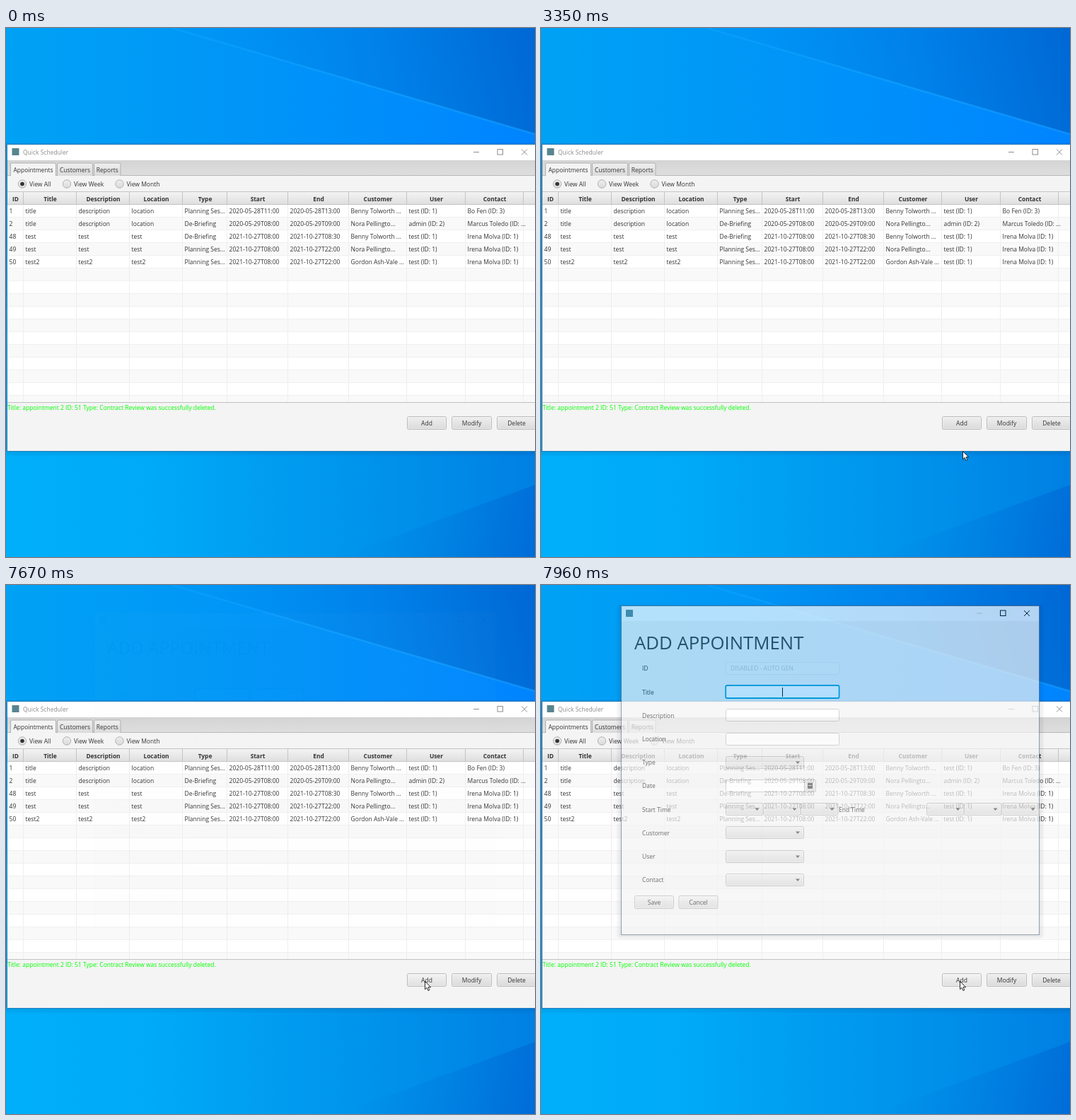
Recreate the animation shown at these times as an HTML page. Size 748 by 748 pixels, loop 8 s.

```html
<!DOCTYPE html>
<html lang="en">
<head>
<meta charset="utf-8">
<title>Scheduler</title>
<style>
html, body { margin: 0; width: 100%; height: 100%; overflow: hidden; background: #009cf0; }
svg { display: block; width: 100vw; height: 100vh; }
text { font: 8.5px "Open Sans", "Noto Sans", sans-serif; fill: #333; white-space: pre; }
.head { font-weight: 700; font-size: 8.4px; }
.big { font-size: 25.7px; }
.mid { text-anchor: middle; }
</style>
</head>
<body>
<svg id="stage" viewBox="0 0 748 748" xmlns="http://www.w3.org/2000/svg"></svg>
<script>
const LOOP = 8000;
const stage = document.getElementById("stage");

// Markup helpers
const rect = (x, y, w, h, fill, more = "") =>
  `<rect x="${x}" y="${y}" width="${w}" height="${h}" fill="${fill}" ${more}/>`;
const line = (x1, y1, x2, y2, color, more = "") =>
  `<path d="M${x1} ${y1}L${x2} ${y2}" stroke="${color}" fill="none" ${more}/>`;
const text = (x, y, s, cls = "", more = "") => `<text x="${x}" y="${y}" class="${cls}" ${more}>${s}</text>`;
const gradient = (id, dir, ...stops) =>
  `<linearGradient id="${id}" ${dir}>` + stops.map(([at, c, o = 1]) =>
    `<stop offset="${at}" stop-color="${c}" stop-opacity="${o}"/>`).join("") + `</linearGradient>`;
const DOWN = 'x1="0" y1="0" x2="0" y2="1"';
const ACROSS = 'x1="0" y1="0" x2="1" y2="0"';

const box = (x, y, w, h, fill, edge, more = "") =>
  rect(x + .5, y + .5, w - 1, h - 1, fill, `stroke="${edge}" rx="2" ${more}`);
const raised = (x, y, w, h, more = "") => box(x, y, w, h, "url(#btn)", "#b9b9b9", more) +
  rect(x + 1.4, y + 1.4, w - 2.8, h - 2.8, "none", 'stroke="#fff" stroke-opacity=".45" stroke-width=".8" rx="1.5"');
const button = (x, y, w, h, label, id = "") =>
  raised(x, y, w, h, id && `id="${id}"`) + text(x + w / 2, y + 12.8, label, "mid");
const combo = (x, y, w) => raised(x, y, w, 18) +
  `<path d="M${x + w - 12} ${y + 7.6}h6l-3 3.4z" fill="#555"/>`;

function controls(minX, maxX, closeX, y, minColor) {
  return line(minX, y, minX + 8, y, minColor) +
    `<rect x="${maxX}" y="${y - 4}" width="7.5" height="7.5" fill="none"/>` +
    `<path d="M${closeX} ${y - 4}l8 8m0-8l-8 8" fill="none"/>`;
}

function shadow(x, y, w, h) {
  let out = "";
  for (let i = 1; i < 8; i++) {
    out += rect(x - i, y - i / 3, w + 2 * i, h + i * 1.33, "#001830", `rx="${i}" opacity=".03"`);
  }
  return out;
}

function wallpaper() {
  return rect(0, 0, 748, 380, "url(#skyTop)") +
    `<path d="M235 0L748 150V0Z" fill="url(#ray)"/>` +
    line(235, 0, 748, 150, "url(#beam)", 'stroke-width="2.6"') +
    rect(0, 380, 748, 368, "url(#skyLow)") +
    `<path d="M470 748L748 646V748Z" fill="url(#rayLow)"/>`;
}

// Main window
const edges = [2, 25, 100, 175, 250, 313, 399, 485, 567, 650, 732];
const heads = ["ID", "Title", "Description", "Location", "Type", "Start", "End", "Customer", "User", "Contact"];
const plan = "Planning Ses...", brief = "De-Briefing";
const ben = "Benny Tolworth ...", nora = "Nora Pellingto...", irena = "Irena Molva (ID: 1)";
const user = "test (ID: 1)", day = "2021-10-27T";
const rows = [
  ["1", "title", "description", "location", plan, "2020-05-28T11:00", "2020-05-28T13:00", ben, user, "Bo Fen (ID: 3)"],
  ["2", "title", "description", "location", brief, "2020-05-29T08:00", "2020-05-29T09:00", nora, "admin (ID: 2)", "Marcus Toledo (ID: ..."],
  ["48", "test", "test", "test", brief, day + "08:00", day + "08:30", ben, user, irena],
  ["49", "test", "test", "test", plan, day + "08:00", day + "22:00", nora, user, irena],
  ["50", "test2", "test2", "test2", plan, day + "08:00", day + "22:00", "Gordon Ash-Vale ...", user, irena]
];

function table() {
  let out = rect(2, 232, 746, 298, "#fff");
  for (let i = 0; i < 16; i++) {
    const y = 250 + 18 * i;
    if (i % 2) out += rect(2, y, 746, Math.min(18, 530 - y), "#f9f9f9");
    if (i) out += line(2, y - .5, 748, y - .5, "#f0f0f0");
  }
  out += rect(2, 232, 746, 18, "url(#head)") +
    line(2, 231.5, 748, 231.5, "#c4c4c4") + line(2, 249.5, 748, 249.5, "#c4c4c4");
  edges.slice(1).forEach(x => {
    out += line(x - .5, 232, x - .5, 250, "#c4c4c4") + line(x - .5, 250, x - .5, 530, "#eee");
  });
  heads.forEach((s, i) => out += text((edges[i] + edges[i + 1]) / 2, 244.5, s, "head mid"));
  rows.forEach((row, r) => row.forEach((s, c) =>
    out += text(edges[c] + 2.6, 262 + 18 * r, s)));
  return out + line(2, 529.5, 748, 529.5, "#c0c0c0");
}

function tab(x, w, label, on) {
  return `<path d="M${x + .5} 209V193q0-2 2-2H${x + w - 2.5}q2 0 2 2V209" stroke="#b0b0b0"
    fill="${on ? "#f4f4f4" : "url(#btn)"}"/>` + text(x + w / 2, 203.5, label, "mid");
}

function radio(x, label, on) {
  return `<circle cx="${x}" cy="220.5" r="5.7" fill="url(#btn)" stroke="#b0b0b0"/>` +
    (on ? `<circle cx="${x}" cy="220.5" r="2.8" fill="#333"/>` : "") + text(x + 10, 224, label);
}

function mainWindow() {
  return `<g id="mainShadow">${shadow(2, 164, 780, 435)}</g>` +
    rect(1.5, 164.5, 780, 434, "#f4f4f4", 'stroke="#2a7fb8"') +
    rect(2, 165, 746, 22, "#fff") + rect(8.5, 170, 10, 10, "#57858f") +
    text(24, 178.8, "Quick Scheduler", "", 'id="caption"') +
    `<g id="mainCtl">${controls(661, 695, 729, 175.5, "inherit")}</g>` +
    rect(2, 187, 746, 22, "url(#strip)") + line(2, 208.5, 748, 208.5, "#b8b8b8") +
    tab(72, 51, "Customers") + tab(124, 38.5, "Reports") + tab(6, 65, "Appointments", true) +
    radio(23, "View All", true) + radio(86, "View Week") + radio(160.5, "View Month") +
    table() +
    text(2, 540, "Title: appointment 2 ID: 51 Type: Contract Review was successfully deleted.", "", 'style="fill:#0f0"') +
    button(567, 549, 56, 19, "Add", "add") + button(630, 549, 57, 19, "Modify") +
    button(694, 549, 56, 19, "Delete");
}

// Dialog
function dialog() {
  const labels = ["ID", "Title", "Description", "Location", "Type", "Date", "Start Time", "Customer", "User", "Contact"];
  const top = i => Math.round(109 + 33.2 * i);
  const field = (i, w = 161) => box(261, top(i), w, 18, "#fff", "#c4c4c4");
  return `<g opacity=".6">${shadow(113, 29, 592, 465)}</g>` +
    rect(113.5, 29.5, 591, 465, "#f4f4f4", 'stroke="#66788a"') +
    rect(114, 30, 590, 21, "#fff") + rect(120, 35, 10, 10, "#57858f") +
    `<g stroke="#000">${controls(616, 649.5, 683, 40, "#ccc")}</g>` +
    text(132, 91.3, "ADD APPOINTMENT", "big") +
    labels.map((s, i) => text(143, 121.3 + 33.2 * i, s)).join("") +
    `<g opacity=".25">${field(0)}${text(268, 121.3, "DISABLED - AUTO GEN")}</g>` +
    rect(261.2, 142, 160.4, 18, "#fff", 'rx="2" stroke="#039ed3" stroke-width="1.8"') +
    line(341.5, 145, 341.5, 158, "#000") +
    field(2) + field(3) + combo(261, top(4), 111) +
    field(5, 112) + raised(372, top(5), 17, 18) +
    rect(377, top(5) + 5, 7, 8, "#555") + line(378, top(5) + 8.5, 383, top(5) + 8.5, "#ccc") +
    [261, 314, 367, 545, 598, 651].map(x => combo(x, top(6), 53.5)).join("") +
    text(421, 320.5, "End Time") +
    [7, 8, 9].map(i => combo(261, top(i), 111)).join("") +
    button(132, 439, 56, 19, "Save") + button(194.5, 439, 56, 19, "Cancel");
}

stage.innerHTML = `<defs>` +
  gradient("skyTop", ACROSS, [0, "#00a2f5"], [.35, "#0098f6"], [.7, "#008efb"], [1, "#0084ff"]) +
  gradient("skyLow", ACROSS, [0, "#00aff9"], [.27, "#00aaf8"], [.5, "#009df1"], [.75, "#0090ea"], [1, "#0080e2"]) +
  gradient("ray", 'gradientUnits="userSpaceOnUse" x1="300" y1="80" x2="740" y2="-20"',
    [0, "#0096f6"], [.5, "#0082ea"], [1, "#0068d4"]) +
  gradient("rayLow", 'gradientUnits="userSpaceOnUse" x1="500" y1="700" x2="748" y2="748"',
    [0, "#0094ec"], [.5, "#0082e2"], [1, "#006cd8"]) +
  gradient("beam", ACROSS, [0, "#12a6ff", .4], [.5, "#10a0ff", .7], [1, "#18a0ff", .55]) +
  gradient("btn", DOWN, [0, "#efefef"], [1, "#dadada"]) +
  gradient("btnHover", DOWN, [0, "#f4f4f4"], [1, "#dfdfdf"]) +
  gradient("btnDown", DOWN, [0, "#d2d2d2"], [1, "#c4c4c4"]) +
  gradient("head", DOWN, [0, "#f3f3f3"], [1, "#dedede"]) +
  gradient("strip", DOWN, [0, "#d4d4d4"], [1, "#dedede"]) +
  `</defs>` + wallpaper() + mainWindow() + `<g id="dialog">${dialog()}</g>` +
  `<path id="cursor" d="M.5 .5V11.8L3.1 9.4L4.9 13.5L6.8 12.7L5 8.7H8.6Z" fill="#fff" stroke="#111" stroke-width=".9"/>`;

const [mainShadow, caption, mainCtl, add, pop, cursor] =
  ["mainShadow", "caption", "mainCtl", "add", "dialog", "cursor"].map(id => document.getElementById(id));

// Keys are [time, ...values], interpolated linearly
const path = [
  [500, 696, 745], [1210, 691, 712], [1310, 687, 707], [1940, 645, 642], [2040, 637, 635],
  [2140, 632, 631], [2900, 604, 607], [3000, 602, 605], [3730, 589, 590], [3830, 589, 592],
  [4560, 588, 580], [4660, 588, 579], [4790, 588, 577], [5120, 594, 556], [5430, 590, 565],
  [5530, 589, 565], [5780, 590, 562], [5980, 591, 561], [6100, 592, 560]
];
const holds = [[1210, 1310], [2040, 2140], [2900, 3000], [3730, 3830], [4560, 4660], [5430, 5530], [5780, 5980]];
const fade = [[7640, 0, .955], [7670, .012, .96], [7800, .39, .983], [7960, .7, 1]];

function sample(keys, t) {
  const i = keys.findIndex(k => k[0] > t);
  if (i === 0) return keys[0].slice(1);
  if (i < 0) return keys[keys.length - 1].slice(1);
  const a = keys[i - 1], b = keys[i], u = (t - a[0]) / (b[0] - a[0]);
  return a.slice(1).map((v, j) => v + (b[j + 1] - v) * u);
}

function draw(t) {
  const pause = holds.find(([a, b]) => t >= a && t < b);
  const [x, y] = sample(path, pause ? pause[0] : t).map(Math.round);
  cursor.setAttribute("transform", `translate(${x} ${y})`);
  cursor.setAttribute("visibility", t < 500 ? "hidden" : "visible");

  const active = t >= 6710 && t < 7420;
  mainShadow.setAttribute("opacity", active ? 1 : .4);
  caption.style.fill = active ? "#000" : "#8c8c8c";
  mainCtl.setAttribute("stroke", active ? "#000" : "#8c8c8c");

  const over = t >= 500 && x > 567 && x < 623 && y > 549 && y < 568;
  const pressed = t >= 6740 && t < 7420;
  add.setAttribute("fill", `url(#${pressed ? "btnDown" : over ? "btnHover" : "btn"})`);

  const [alpha, size] = sample(fade, t);
  pop.setAttribute("opacity", alpha);
  pop.setAttribute("visibility", alpha > 0 ? "visible" : "hidden");
  pop.setAttribute("transform", `translate(408.7 261.5) scale(${size}) translate(-408.7 -261.5)`);
}

const start = performance.now();
function tick() {
  draw((performance.now() - start) % LOOP);
  requestAnimationFrame(tick);
}
tick();
</script>
</body>
</html>
```
